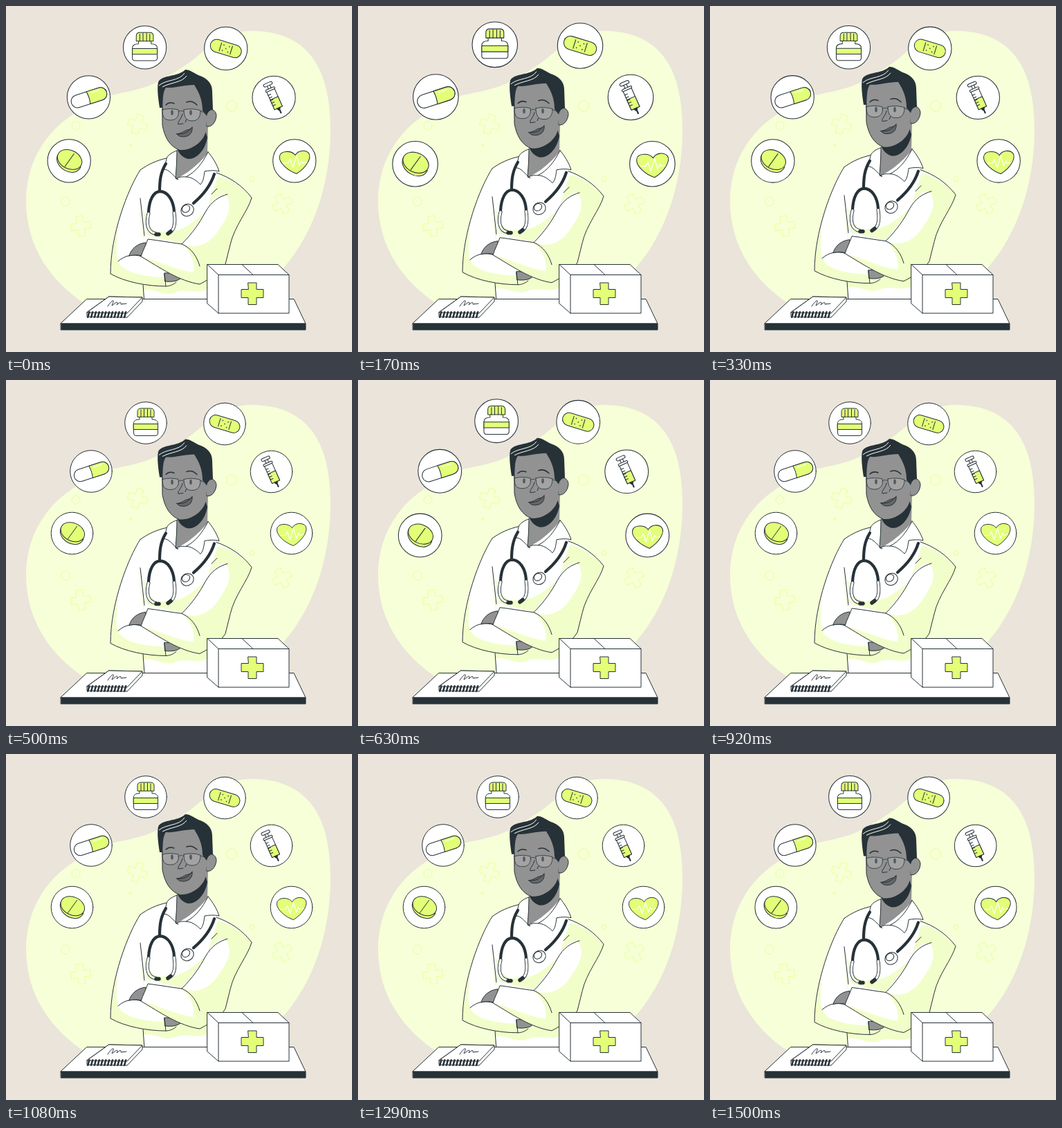
Write an HTML page that moves like this. It is 500 by 500 pixels and loops after 1540 ms.

```html
<!DOCTYPE html>
<html lang="en">
<head>
<meta charset="utf-8">
<title>Doctor</title>
<style>
  html, body { margin: 0; width: 100%; height: 100%; overflow: hidden; background: #eae4da; }
  svg { display: block; width: 100%; height: 100%; }
  .ink { stroke: #263238; stroke-width: 1; stroke-linejoin: round; stroke-linecap: round; }
  .line { fill: none; }
  .white { fill: #fff; }
  .lime { fill: #e3ff78; }
  .pale { fill: #f6ffd7; }
  .shade { fill: #f2fec9; }
  .dark { fill: #263238; }
  .skin { fill: #929292; }
  .deco { fill: none; stroke: #e8ff98; stroke-width: 1; }
  .tube { fill: none; stroke: #263238; stroke-width: 4.2; stroke-linecap: round; }
</style>
</head>
<body>
<svg viewBox="0 0 500 500">
  <defs>
    <path id="plus" d="M-5-15H5V-5H15V5H5V15H-5V5H-15V-5H-5Z"/>
    <circle id="disc" r="30.3" class="ink white"/>
  </defs>

  <path class="pale" d="M355 36C430 36 469 82 469 178C469 265 440 335 400 380L340 440H130C62 402 29 345 29 282C29 225 58 180 101 154C118 143 132 134 151 129C175 124 198 120 216 111C236 101 250 92 266 81C292 62 310 36 355 36Z"/>
  <g class="deco">
    <use href="#plus" transform="translate(190 171) rotate(18) scale(.93)"/>
    <use href="#plus" transform="translate(108 318) rotate(-9) scale(.96)"/>
    <use href="#plus" transform="translate(399 286) rotate(-27) scale(.93)"/>
    <circle cx="101" cy="173" r="6"/>
    <circle cx="326" cy="144.500" r="7.500"/>
    <circle cx="86" cy="282.500" r="6.500"/>
    <circle cx="355.500" cy="250" r="3.500"/>
    <circle cx="180" cy="201" r="1.500"/>
  </g>

  <g id="icons">
    <g transform="translate(95.500 221.500)">
      <use href="#disc"/>
      <g transform="rotate(25)" class="ink lime">
        <path d="M-18-1C-18 18 18 21 18.500 1Z"/>
        <ellipse cy="-2" rx="18" ry="13"/>
      </g>
      <path class="ink line" d="M-6 8L7-10"/>
    </g>
    <g transform="translate(123 132)">
      <use href="#disc"/>
      <g transform="translate(.5 .5) rotate(-18)" class="ink">
        <rect class="white" x="-26" y="-9" width="52" height="18" rx="9"/>
        <path class="lime" d="M-1-9H17A9 9 0 0 1 17 9H-1Q1 0-1-9Z"/>
        <path class="line" style="stroke:#fff" d="M5-5.500H17"/>
      </g>
    </g>
    <g transform="translate(202 62)">
      <use href="#disc"/>
      <g class="ink">
        <path class="white" d="M-9-10V-5C-15-5-17.500-3-17.500 1V15Q-17.500 18.500-14 18.500H14Q17.500 18.500 17.500 15V1C17.500-3 15-5 9-5V-10Z"/>
        <path class="lime" d="M-17.500 1.500H17.500V9.500H-17.500ZM-12-9V-16Q-12-21-7-21H7Q12-21 12-16V-9Z"/>
        <path class="line" d="M-7-19V-9M-2.500-20V-9M2.500-20V-9M7-19V-9"/>
      </g>
    </g>
    <g transform="translate(316 63.500)">
      <use href="#disc"/>
      <g transform="rotate(17)" class="ink">
        <rect class="lime" x="-22.500" y="-9" width="45" height="18" rx="9"/>
        <path class="line" d="M-8-6V6M8-6V6"/>
        <path class="line" stroke-dasharray="0 8" style="stroke-width:1.600" d="M-4-4H5M-4 4H5M0 0H1"/>
      </g>
    </g>
    <g transform="translate(383.500 132.500)">
      <use href="#disc"/>
      <g transform="rotate(-24)" class="ink">
        <path class="white" d="M-2-20H2V-8H-2Z"/>
        <rect class="white" x="-6.500" y="-22.500" width="13" height="4" rx="2"/>
        <path class="white" d="M-6-12H6V16H-6Z"/>
        <path class="lime" d="M-6 1H6V16H-6Z"/>
        <rect class="white" x="-7" y="-14" width="14" height="3" rx="1.500"/>
        <path class="dark" d="M-2.500 16H2.500L1 19V24H0V19H-1Z"/>
        <path class="line" d="M-6-6H-2M-6-2H-2M-6 2H-2M-6 6H-2M-6 10H-2"/>
      </g>
    </g>
    <g transform="translate(412.500 221.500)">
      <use href="#disc"/>
      <path class="ink lime" d="M1-8C5-15 15-16 20-11C25-4 16 10 3 18C-9 14-22 3-21-6C-20-15-4-15 1-8Z"/>
      <path class="line" stroke="#fff" stroke-width="1.200" d="M-16 3H-9L-6-2L-2 9L3-7L7 7L10 0L12 3L18 2"/>
    </g>
  </g>

  <g id="figure">
    <path class="white" d="M240 218C222 222 206 229 194 237L190 278L200 335L198 402L201 445H291L300 395L310 300L304 241L292 212Z"/>
    <path class="shade" d="M193 282C199 300 202 312 203 331L254 343L290 297C273 308 258 328 229 326C214 330 203 315 200 300ZM198 402L291 385V409C276 418 262 407 245 414C228 421 215 407 199 411Z"/>
    <path class="ink line" d="M232 220C218 223 205 229 194 237M198 402L201 445"/>

    <path class="skin" d="M248 195L245 250C262 243 281 226 291 213L292 170Z"/>
    <path class="dark" d="M247 205C256 211 276 208 288 180L291 190C288 208 276 221 264 221C256 220 250 214 247 205Z"/>
    <path class="ink white" d="M247 209C239 212 233 216 232 221C231 227 228 232 228 236C236 236 241 245 249 251L245 249Q247 228 247 209ZM292 211C298 218 305 229 308 239C301 237 292 238 287 239C286 247 285 254 281 258C275 252 268 247 260 247C274 240 284 227 292 211Z"/>
    <path class="ink line" d="M246 250C251 246 256 247 260 247"/>

    <path class="ink skin" d="M289 152C296 146 304 151 304 159C303 169 296 176 290 174Z"/>
    <path class="skin" d="M224 118L226 172C229 190 237 203 250 208C268 209 285 197 289 181L291 150L283 112L240 108Z"/>
    <path class="ink line" d="M226 145V172C229 190 237 203 250 208"/>
    <path class="dark" d="M222 147C220 134 218 119 220 110C225 99 248 103 259 92C266 92 272 97 278 100C291 104 298 112 298 123L299 150C294 150 291 154 290 159L284 151C284 136 279 125 272 114C257 114 244 119 231 118C226 125 227 136 226 147Z"/>
    <path class="line" stroke="#fff" d="M221 115C231 106 250 109 258 97M226 117C239 110 254 111 261 101"/>
    <g class="ink line">
      <path stroke-width="1.500" d="M231 143Q236 138 243 141M261 139Q269 136 276 143"/>
      <path d="M255 156C254 163 247 168 249 171L256 170M259 168L261 164"/>
      <path style="stroke-width:.8" fill="#bbb" fill-opacity=".4" d="M226 150Q237 147 249 150C251 159 246 165 238 165C228 165 226 160 226 150ZM257 150Q269 147 281 151C281 161 277 166 269 166C260 166 257 160 257 150ZM249 153Q253 150 257 153M281 152L290 155"/>
    </g>
    <g class="dark" fill-opacity=".65">
      <ellipse cx="240" cy="154" rx="1.800" ry="3.800"/>
      <ellipse cx="267" cy="154" rx="1.800" ry="3.800"/>
    </g>
    <path class="ink" fill="#666" d="M247 185C255 184 259 179 263 179C266 178 268 177 269 175C270 184 264 189 256 189C252 189 249 188 247 185Z"/>
    <path class="ink line" d="M247 185C256 186 263 183 269 175"/>

    <path class="tube" d="M231 228C223 241 222 253 222 268M301 243C296 259 284 274 271 285M206 298C207 280 213 269 222 268C234 268 242 281 243 297"/>
    <g class="line" stroke-linecap="round">
      <path class="ink" style="stroke-width:5" d="M206 300C202 315 205 327 216 329M243 299C245 313 244 322 238 326"/>
      <path stroke="#fff" stroke-width="3.200" d="M206 300C202 315 205 327 216 329M243 299C245 313 244 322 238 326"/>
      <path class="tube" style="stroke-width:5.500" d="M217 330H221M238 326L234 329"/>
    </g>
    <g class="ink white">
      <ellipse cx="262" cy="295" rx="9.500" ry="8.500" transform="rotate(-35 262 295)"/>
      <ellipse cx="260" cy="293" rx="6" ry="5" transform="rotate(-35 260 293)"/>
    </g>

    <path class="white" d="M194 237C176 265 151 330 151 387C172 399 204 405 231 405L236 385L200 350L190 278Z"/>
    <path class="shade" d="M151 387C152 365 156 342 162 322C160 342 158 358 162 369C166 381 188 391 230 392V405C204 405 172 399 151 387Z"/>
    <path class="ink skin" d="M229 386C237 385 246 389 253 393C248 398 239 399 230 398Z"/>
    <path class="ink line" d="M194 237C176 265 151 330 151 387C172 399 204 405 231 405C237 405 243 402 246 399M231 405L229 387M194 278L200 332M162 369C172 360 184 358 196 362"/>
    <path class="ink skin" d="M178 361C181 350 191 343 202 342L203 363Q190 358 178 361Z"/>

    <path class="white" d="M205 337C222 339 238 342 254 344C270 328 280 313 288 298L304 241C324 248 341 259 355 277C350 296 330 318 324 345L317 373C310 385 297 393 280 402C251 398 222 378 195 362C198 353 202 346 205 337Z"/>
    <path class="shade" d="M306 246C325 250 341 262 355 277C350 296 330 318 324 345L317 373C310 385 297 393 280 402C251 398 222 378 197 363C225 370 246 382 271 385C274 369 264 352 254 344C274 352 293 345 306 326C319 307 329 292 318 273C310 270 300 278 292 289Z"/>
    <path class="ink line" d="M304 241C324 248 341 259 355 277C350 296 330 318 324 345L317 373C310 385 297 393 280 402C251 398 222 378 195 362C198 353 202 346 205 337C222 339 238 342 254 344C268 350 276 362 280 376M254 344C270 328 280 313 288 298C297 282 307 276 320 272M297 272L305 264"/>
  </g>

  <g class="ink white">
    <path d="M117 423.500H416L433 459H79Z"/>
    <path class="dark" d="M79.500 459H433V468H79.500Z"/>

    <path d="M149 420L197 421V427L175 450L117 449V443Z"/>
    <path d="M149 420L197 421L175 444L117 443Z"/>
    <path class="line" transform="translate(0 446) skewX(-15)" style="stroke-width:9.500;stroke-linecap:butt" stroke-dasharray="2.600 2.200" d="M118 0H175"/>
    <path class="line" d="M147 434C151 427 157 423 155 428C153 433 151 435 157 430C161 426 162 429 160 432C164 428 167 427 166 431L174 430"/>

    <path d="M291 373.500H393L409 388.500V444H307L291 430Z"/>
    <path class="line" d="M291 373.500L307 388.500H409M307 388.500V444M341 373.500L357 388.500"/>
    <path class="lime" d="M350 400H362V409.500H372V421.500H362V431.500H350V421.500H340V409.500H350Z"/>
  </g>
</svg>
<script>
  const LOOP = 1540, LEAD = 41;
  const icons = document.getElementById('icons');
  const figure = document.getElementById('figure');
  const beat = [[0, 1], [.1, 1.1], [.3, 1], [.4, 1], [.5, 1.1], [.6, 1], [1, 1]];

  function keyed(stops, p) {
    const i = stops.findIndex(([at]) => at > p);
    const [a, from] = stops[i - 1], [b, to] = stops[i];
    return from + (to - from) * (p - a) / (b - a);
  }

  function draw(now) {
    const p = (now + LEAD) % LOOP / LOOP;
    const rise = 10 * (1 - Math.abs(1 - 2 * p));
    icons.setAttribute('transform', `translate(254 138) scale(${keyed(beat, p)}) translate(-254 -138)`);
    figure.setAttribute('transform', `translate(0 ${0.5 - rise})`);
  }

  const start = performance.now();
  function tick() {
    draw(performance.now() - start);
    requestAnimationFrame(tick);
  }
  tick();
</script>
</body>
</html>
```
